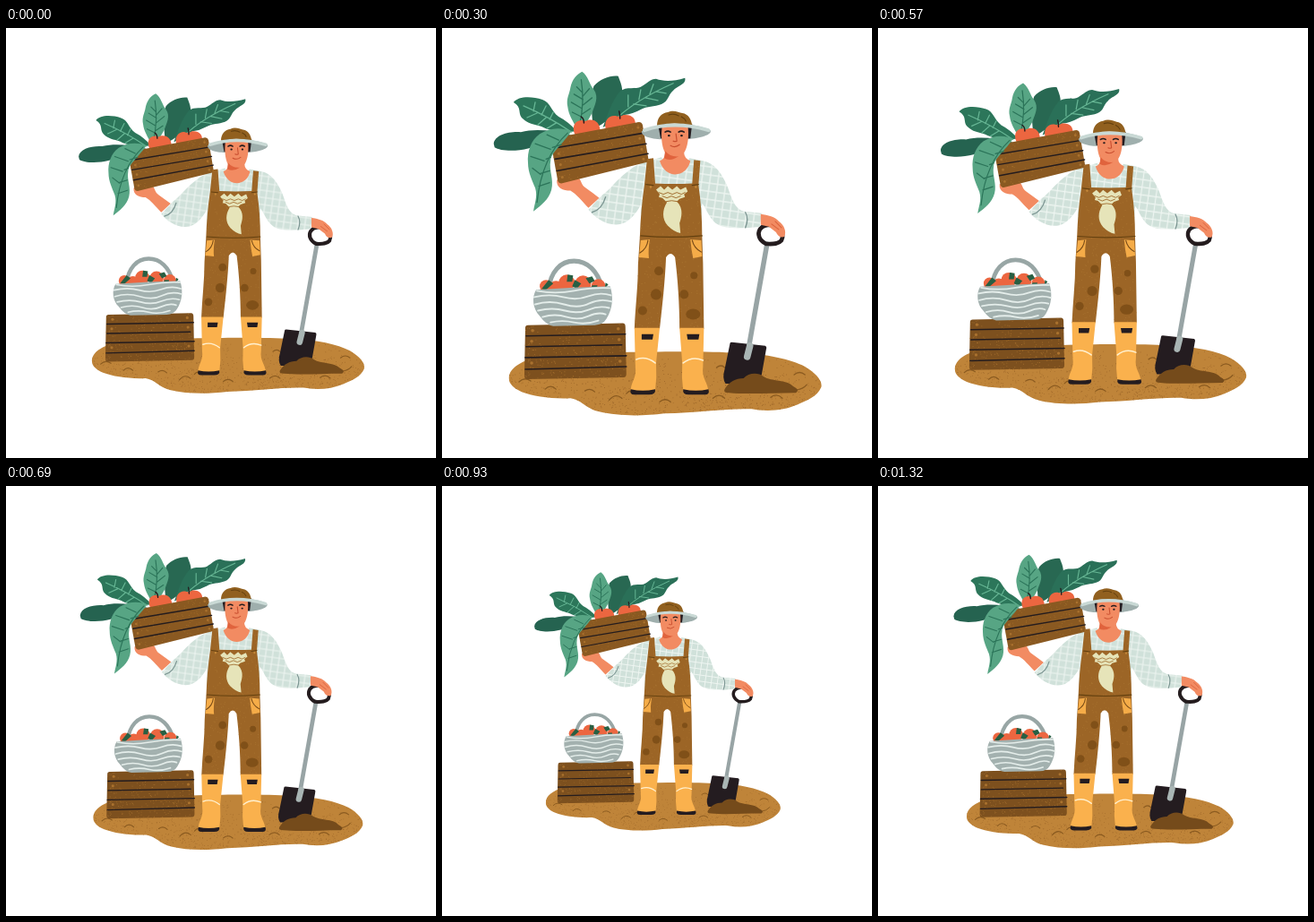
These frames come from a looping animation (480x480 px, 1.35 s). An HTML page:

```html
<!DOCTYPE html>
<html lang="en">
<head>
<meta charset="utf-8">
<title>Farmer</title>
<style>
@property --phase { syntax: "<angle>"; inherits: false; initial-value: 0deg; }
html, body { margin: 0; width: 100%; height: 100%; overflow: hidden; background: #fff; }
svg { display: block; width: 100vw; height: 100vh; }
#scene {
  transform-origin: 240px 240px;
  transform: scale(calc(.878 + .131 * sin(var(--phase))));
  animation: breathe 1350ms steps(45) infinite;
}
@keyframes breathe { to { --phase: 360deg; } }
.line { fill: none; stroke-linecap: round; stroke-linejoin: round; }
.ink { stroke: #241c1e; }
.vein { stroke: #2b7459; stroke-width: 1.3; }
.pale { stroke: #67b795; stroke-width: 1.3; }
.skin { fill: #f28b62; }
.apple { fill: #ec6640; }
.boot { fill: #fab14d; }
.shirt { fill: url(#check); }
.dark { fill: #241c20; }
</style>
</head>
<body>
<svg viewBox="0 0 480 480">
<defs>
  <pattern id="check" width="9" height="9" patternUnits="userSpaceOnUse" patternTransform="rotate(8)">
    <path fill="#d0e1da" d="M0 0h9v9H0z"/>
    <path d="M0 4.5h9M4.5 0v9" stroke="#eef5f1" stroke-width="1.3"/>
  </pattern>
</defs>
<g id="scene">

  <!-- ground -->
  <path id="ground" fill="#bf8439" d="M76 391C75 380 87 372 102 368C130 360 175 362 210 361C265 360 300 360 330 362C362 363 388 369 404 377C416 384 424 393 422 400C418 410 406 415 396 419C380 426 362 427 345 424C318 423 285 428 248 429C224 432 196 432 176 427C160 423 157 414 144 412C124 413 103 410 90 405C81 401 76 396 76 391Z"/>
  <g id="groundGrain"></g>
  <path class="line" stroke="#8b5b20" stroke-width="1.3" d="M87 394q6-6 13-1M116 402q6-6 12 0M160 404q6-4 11 1M187 414q7-8 14-2M206 407q4-5 9-2M243 416q6-5 12 0M302 412q7-6 13 0M366 411q7-5 13 1M392 386q6-5 12 0M394 403q8-1 12-6M306 378q5-4 9 0"/>

  <!-- low crate -->
  <path id="crate" fill="#7d501e" d="M97 331L202 329Q205 329 205 333L206 385Q206 389 203 389L96 391Q93 391 93 387L94 334Q94 331 97 331Z"/>
  <g id="crateGrain"></g>
  <path class="line ink" stroke-width="1.6" d="M95 343L205 341M95 355L201 353M94 367L206 365M94 380L206 377"/>
  <path class="line" stroke="#a9712e" stroke-width="3.5" d="M102 337h.1M197 335h.1M101 349h.1M198 347h.1M101 373h.1M199 371h.1"/>

  <!-- basket -->
  <path class="line" stroke="#98a6a5" stroke-width="5" d="M120 291C122 272 133 260 148 260C163 260 174 271 179 289"/>
  <g class="apple">
    <circle cx="117" cy="288" r="7"/><circle cx="140" cy="284" r="9"/><circle cx="158" cy="285" r="9"/><circle cx="175" cy="288" r="8"/><circle cx="128" cy="290" r="8"/>
  </g>
  <path fill="#285f43" d="M120 281l5 4-8 7-5-1zM141 275l6 1-1 7-6 0zM149 281l7 4-5 6-5-3zM161 279l7-2 3 5-6 3zM168 287l6 0-1 5-6 0zM183 284l3 2-4 5z"/>
  <path fill="#a3b1af" d="M106 292Q148 289 188 288C192 300 191 313 184 324Q180 331 171 331L125 332Q117 331 110 321C102 313 101 300 106 292Z"/>
  <path class="line" stroke="#e4edea" stroke-width="1.9" d="M107 293q20 4 41 0t40-3M104 300q17-4 32 0t28-1t25-1M105 308q16-5 32 0t28-1t25-2M108 315q16-4 30 0t26-1t23-2M113 322q14-4 27 0t24-1t19-2M122 328q13-3 26 0t27-2"/>

  <!-- mound and shovel -->
  <path class="dark" d="M321 351Q321 350 323 350L360 354Q362 355 361 358L356 386Q352 395 342 396L316 396Q312 390 315 380Z"/>
  <path class="line" stroke="#98a4a5" stroke-width="5.5" d="M362 241L342 354"/>
  <path class="line" stroke="#a9b5b4" stroke-width="7.5" d="M343 354L340 366"/>
  <path fill="#754b1b" d="M315 402C320 394 327 390 336 390C341 384 352 383 358 388C367 394 384 391 391 399Q399 403 394 406C368 406 340 408 320 406Q313 406 315 402Z"/>
  <path class="line ink" stroke-width="4.6" d="M361 241C353 237 351 230 354 225C358 219 367 219 374 222C380 225 380 233 378 237C374 242 367 241 361 241Z"/>

  <!-- leaves behind the high crate -->
  <path fill="#256350" d="M59 130C60 120 76 116 89 117C105 113 123 115 145 120C126 124 109 130 98 135C83 139 66 138 60 134Z"/>
  <path fill="#286852" d="M169 112C168 94 165 78 170 66C177 58 188 54 197 55C199 61 204 69 200 80C194 95 185 106 174 111Z"/>
  <path fill="#2c765a" d="M81 84C86 77 101 77 113 81C122 84 122 93 131 100Q141 105 151 116C136 118 121 116 112 111C103 108 97 108 91 102C85 96 91 90 81 84Z"/>
  <path class="line pale" d="M92 88Q120 100 145 117M103 94L105 84M112 98L117 88M121 103L125 95M107 96L96 101M117 101L108 109M128 107L118 113"/>
  <path fill="#2a7058" d="M180 112C185 98 190 82 199 72C206 66 217 70 222 67C229 63 233 58 239 58C247 61 258 61 271 57C273 64 262 66 258 71C252 76 253 83 245 86C237 89 229 88 222 92Q213 97 204 98Z"/>
  <path class="line pale" d="M193 104Q215 82 258 63M208 89L208 76M220 81L222 70M232 75L236 64M214 86L228 88M227 79L241 82M239 72L250 74"/>
  <path fill="#57a584" d="M157 50C164 55 165 64 170 70C176 79 171 87 168 96Q163 105 157 115L151 113C147 105 142 98 141 89C139 80 143 75 144 68C146 58 151 53 157 50Z"/>
  <path class="line vein" d="M156 59Q160 84 154 110M157 73L151 67M158 81L148 75M157 91L145 84M156 100L146 95M158 77L165 69M158 87L168 79M157 97L166 91"/>

  <!-- apples and forearm -->
  <g class="apple"><path d="M148 117C146 109 150 104 157 104Q160 106 163 104C171 102 177 107 177 116L150 122Z"/><path d="M183 113C181 104 187 98 194 99Q199 101 203 98C212 97 217 102 216 110L184 118Z"/></g>
  <path class="line ink" stroke-width="1.5" d="M159 107q0-5-3-7M199 102q0-5-1-8"/>
  <path class="skin" d="M129 170L151 166C157 170 155 175 161 179Q168 184 176 190L164 201C156 193 151 186 144 182C136 182 128 179 129 170Z"/>

  <!-- shirt -->
  <path class="shirt" d="M231 149L245 145Q260 176 276 146L291 149C305 152 312 164 318 177C323 191 326 202 336 205L356 207L354 222C336 224 318 225 308 220C298 214 295 202 290 196L288 236L222 236L222 198C216 208 210 216 200 219C185 222 171 212 164 203L179 187C188 181 194 171 207 161Q218 152 231 149Z"/>
  <path class="line" stroke="#7d9693" stroke-width="1.4" d="M168 206Q179 203 183 189M338 206Q342 213 338 223"/>
  <path class="skin" d="M355 208C363 209 371 211 375 216C381 220 384 228 381 233Q375 235 372 228L364 222L355 220Z"/>
  <path class="line" stroke="#db623c" stroke-width="1" d="M367 219l8 6M371 216l7 7"/>

  <!-- high crate -->
  <path id="box" fill="#8a5921" d="M123 124L220 106Q223 106 224 109L231 150L134 174Q131 174 130 171L122 127Z"/>
  <g id="boxGrain"></g>
  <path class="line ink" stroke-width="1.6" d="M125 135L226 118M127 147L228 130M129 160L230 141"/>
  <path class="line" stroke="#a9712e" stroke-width="3" d="M129 129h.1M219 112h.1M131 141h.1M221 124h.1M133 153h.1M223 136h.1M135 167h.1M225 147h.1"/>
  <path fill="#57a584" d="M145 116C132 111 120 113 110 119C100 126 96 139 97 151C97 162 102 171 105 179C108 189 104 197 103 205C112 198 120 192 123 181C126 170 120 160 122 149C122 140 136 130 145 116Z"/>
  <path class="line vein" d="M141 118Q112 145 107 195M131 126L118 120M122 136L105 130M115 149L100 144M111 164L102 157M124 134L134 131M117 147L122 145M111 163L121 160M109 177L121 173"/>

  <!-- head -->
  <path fill="#9fafad" d="M223 116C235 107 282 105 299 115C302 120 288 124 274 125L248 125C235 125 222 122 223 116Z"/>
  <path class="dark" d="M241 108H279L277 124H244Z"/>
  <path class="skin" d="M246 109H274C276 122 274 134 270 140Q270 146 277 149C273 168 249 170 243 149Q249 147 249 140C245 133 244 120 246 109Z"/>
  <path fill="#e0633d" d="M249 138Q255 145 264 144Q255 150 248 146Z"/>
  <path class="line ink" stroke-width="1.7" d="M249 117q3-2 6 0M264 117q3-2 6 0"/>
  <path class="line ink" stroke-width="2.2" d="M253 121h.5M267 121h.5"/>
  <path class="line" stroke="#c94f30" stroke-width="1.2" d="M261 119l1 8q-2 1-4 0M255 132q5 3 10-1"/>
  <path fill="#91601f" d="M240 110C240 101 245 96 252 95C258 92 264 95 268 96C275 97 278 103 279 110Q259 105 240 110Z"/>
  <path class="line" stroke="#64400f" stroke-width="1.2" d="M253 98q6-2 11 1M267 100q4 2 5 5"/>
  <path class="line" stroke="#c9d9d5" stroke-width="4" d="M226 115Q259 104 297 115"/>

  <!-- overalls -->
  <path id="overalls" fill="#9c6526" d="M229 147L236 146L238 174Q259 175 279 174L281 148L288 149L286 176Q290 203 290 233L291 262L292 335H265C265 308 263 280 260 256Q255 248 250 256C249 281 246 309 243 335H215C216 311 219 288 219 264L221 233Q222 203 226 176Z"/>
  <g id="overallsGrain"></g>
  <g fill="#805018">
    <ellipse cx="242" cy="271" rx="5" ry="5"/><ellipse cx="239" cy="297" rx="6" ry="6"/><ellipse cx="224" cy="315" rx="5" ry="5"/><ellipse cx="270" cy="297" rx="5" ry="5"/><ellipse cx="280" cy="319" rx="8" ry="6"/><ellipse cx="281" cy="276" rx="4" ry="4"/>
  </g>
  <path class="line" stroke="#64400f" stroke-width="1.2" d="M222 232Q256 235 290 232M228 175l8 1M279 176l7-1"/>
  <path fill="#f5ac48" d="M222 237L232 236Q230 248 231 257L220 256ZM277 236L289 237L290 255L280 257Q278 248 277 236Z"/>
  <path class="line" stroke="#7a4c18" stroke-width="1.2" d="M230 237Q229 246 221 251M279 237Q281 246 289 250"/>
  <path class="line" stroke="#c58838" stroke-width="2.4" d="M233 178h.1M283 178h.1"/>

  <!-- turnip badge -->
  <path fill="#e6e4b9" d="M239 181L244 177L248 181L252 177L257 181L262 177L266 181L272 178L274 183L270 186L271 189L265 191L262 194C270 202 267 212 265 218L266 229Q259 228 252 221C245 213 246 203 251 195L246 190L242 189L243 186Z"/>
  <path class="line" stroke="#9c6526" stroke-width=".9" d="M242 184l5 2 5-2 5 2 5-2 5 2 4-2M246 188l5 2 5-2 5 2 5-2M250 194q6-2 13 0"/>

  <!-- boots -->
  <path class="boot" d="M215 334H243L239 373Q240 389 238 404L211 405C210 395 218 390 216 377ZM265 334H292L291 377C289 390 297 395 297 405L269 404Q267 389 268 373Z"/>
  <path class="dark" d="M211 402Q224 405 238 402Q239 408 231 408H215Q209 408 211 402ZM269 402Q283 405 297 402Q299 408 293 408H275Q268 408 269 402ZM223 341L236 341L235 347H223ZM273 341H287L286 347H274Z"/>
  <path class="line" stroke="#fff0cf" stroke-width="1.6" d="M217 369Q228 365 238 373M269 373Q279 365 291 370"/>
</g>
</svg>
<script>
const NS = "http://www.w3.org/2000/svg";
let seed = 7;
const rand = () => (seed = seed * 16807 % 2147483647) / 2147483647;

// Scatter small specks inside a shape; low > 1 pushes them downwards.
function grain(id, count, color, low = 1) {
  const shape = document.getElementById(id);
  const box = shape.getBBox();
  const clip = document.createElementNS(NS, "clipPath");
  clip.id = id + "Clip";
  const use = document.createElementNS(NS, "use");
  use.setAttribute("href", "#" + id);
  clip.append(use);
  document.querySelector("defs").append(clip);

  let d = "";
  for (let i = 0; i < count; i++) {
    const x = box.x + rand() * box.width;
    const y = box.y + rand() ** (1 / low) * box.height;
    d += `M${x.toFixed(1)} ${y.toFixed(1)}h.9v.9h-.9z`;
  }
  const specks = document.createElementNS(NS, "path");
  specks.setAttribute("d", d);
  specks.setAttribute("fill", color);
  const layer = document.getElementById(id + "Grain");
  layer.setAttribute("clip-path", `url(#${clip.id})`);
  layer.append(specks);
}
grain("ground", 1100, "#a0692a", 2);
grain("crate", 260, "#a56f2d", 1.3);
grain("box", 200, "#a7712c");
grain("overalls", 420, "#aa7531");
</script>
</body>
</html>
```
